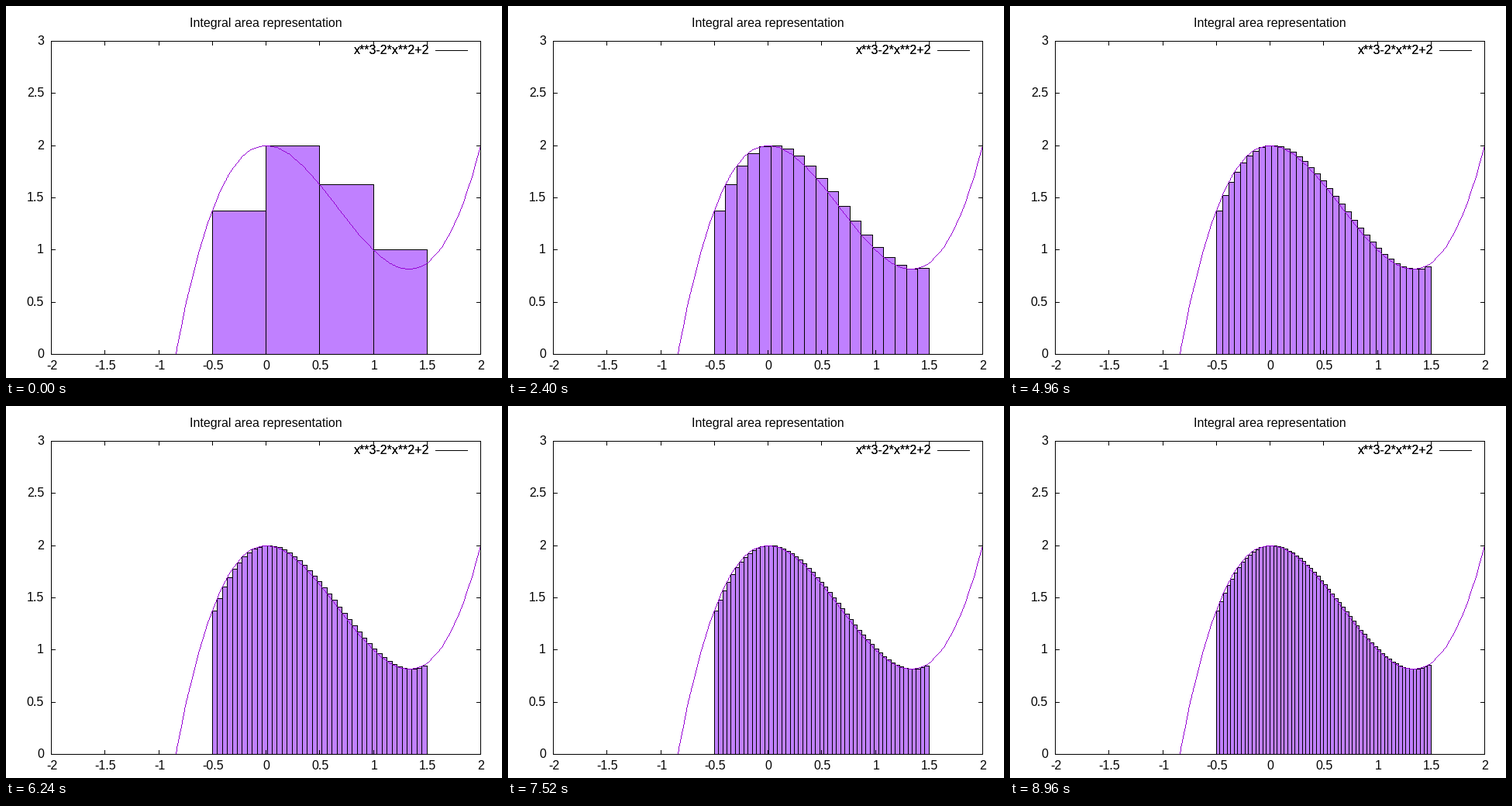
A matplotlib script that plays this animation: 640 by 480 pixels, repeating every 9120 ms.

```python
import numpy as np
import matplotlib.pyplot as plt
from matplotlib.animation import FuncAnimation
from matplotlib.collections import LineCollection, PolyCollection

plt.rcParams["font.family"] = "Liberation Sans"
plt.rcParams["text.hinting"] = "default"

WIDTH, HEIGHT, DPI = 640, 480, 80
PX = 72 / DPI                      # one pixel in points
LEFT, RIGHT, TOP, BOTTOM = 58, 612, 45, 449
X_MIN, X_MAX, Y_MAX = -2, 2, 3
A, B = -0.5, 1.5                   # integration limits
FIRST_COUNT, FRAMES, INTERVAL = 4, 57, 160
TICK = 5
FILL, CURVE = "#c080ff", "#9400d3"


def f(x):
    return x**3 - 2 * x**2 + 2


def to_px(x):
    return np.floor(LEFT + (x - X_MIN) * (RIGHT - LEFT) / (X_MAX - X_MIN) + 0.5)


def to_py(y):
    return BOTTOM - np.floor(y * (BOTTOM - TOP) / Y_MAX + 0.5)


def box(x0, y0, x1, y1):
    return [(x0, y0), (x1, y0), (x1, y1), (x0, y1)]


def curve_pixels():
    """Unit squares of the one-pixel polyline through 100 samples."""
    x = np.linspace(X_MIN, X_MAX, 100)
    y = f(x)
    k = int(np.argmax(y >= 0))
    root = np.interp(0, y[k - 1:k + 1], x[k - 1:k + 1])
    px = to_px(np.append(root, x[k:]))
    py = to_py(np.append(0, y[k:]))
    cells = set()
    for x0, y0, x1, y1 in zip(px, py, px[1:], py[1:]):
        n = int(max(abs(x1 - x0), abs(y1 - y0))) + 1
        cells.update(zip(np.rint(np.linspace(x0, x1, n)),
                         np.rint(np.linspace(y0, y1, n))))
    return [box(cx - 0.5, cy - 0.5, cx + 0.5, cy + 0.5)
            for cx, cy in sorted(cells)]


def bars(count):
    edges = np.linspace(A, B, count + 1)
    px = to_px(edges)
    tops = to_py(f(edges[:-1]))
    return [box(x0, top, x1, BOTTOM) for x0, x1, top in zip(px, px[1:], tops)]


def label(x, y, text, ha):
    ax.text(x, y, text, ha=ha, va="baseline", fontsize=16 * PX, color="black")


fig = plt.figure(figsize=(WIDTH / DPI, HEIGHT / DPI), dpi=DPI, facecolor="white")
ax = fig.add_axes([0, 0, 1, 1])
ax.axis("off")
# Integer coordinates are pixel centres.
ax.set_xlim(-0.5, WIDTH - 0.5)
ax.set_ylim(HEIGHT - 0.5, -0.5)

bar_set = PolyCollection(bars(FIRST_COUNT), facecolors=FILL, edgecolors="black",
                         linewidths=PX, antialiaseds=False, joinstyle="miter",
                         snap=False, zorder=1)
ax.add_collection(bar_set)
ax.add_collection(PolyCollection(curve_pixels(), facecolors=CURVE,
                                 edgecolors="none", linewidths=0,
                                 antialiaseds=False, snap=False, zorder=2))

# Border, ticks and the key sample
lines = [[(LEFT, y), (RIGHT, y)] for y in (TOP, BOTTOM)]
lines += [[(x, TOP), (x, BOTTOM)] for x in (LEFT, RIGHT)]
lines.append([(554, 57), (595, 57)])

for v in np.arange(X_MIN, X_MAX + 0.5, 0.5):
    x = to_px(v)
    lines += [[(x, TOP), (x, TOP + TICK)], [(x, BOTTOM), (x, BOTTOM - TICK)]]
    label(x + 0.6, 468.5, f"{v:g}", "center")

for v in np.arange(0, Y_MAX + 0.5, 0.5):
    y = to_py(v)
    lines += [[(LEFT, y), (LEFT + TICK, y)], [(RIGHT, y), (RIGHT - TICK, y)]]
    label(48.5, y + 4.5, f"{v:g}", "right")

ax.add_collection(LineCollection(lines, colors="black", linewidths=PX,
                                 antialiaseds=False, capstyle="projecting",
                                 snap=False, zorder=3))

label(334.6, 26.5, "Integral area representation", "center")
# The key text is overprinted, which makes it slightly heavier.
for _ in range(2):
    label(545.5, 61.5, "x**3-2*x**2+2", "right")


def update(frame):
    bar_set.set_verts(bars(FIRST_COUNT + frame))
    return [bar_set]


anim = FuncAnimation(fig, update, frames=FRAMES, interval=INTERVAL,
                     repeat=True, repeat_delay=0, blit=False)
plt.show()
```
